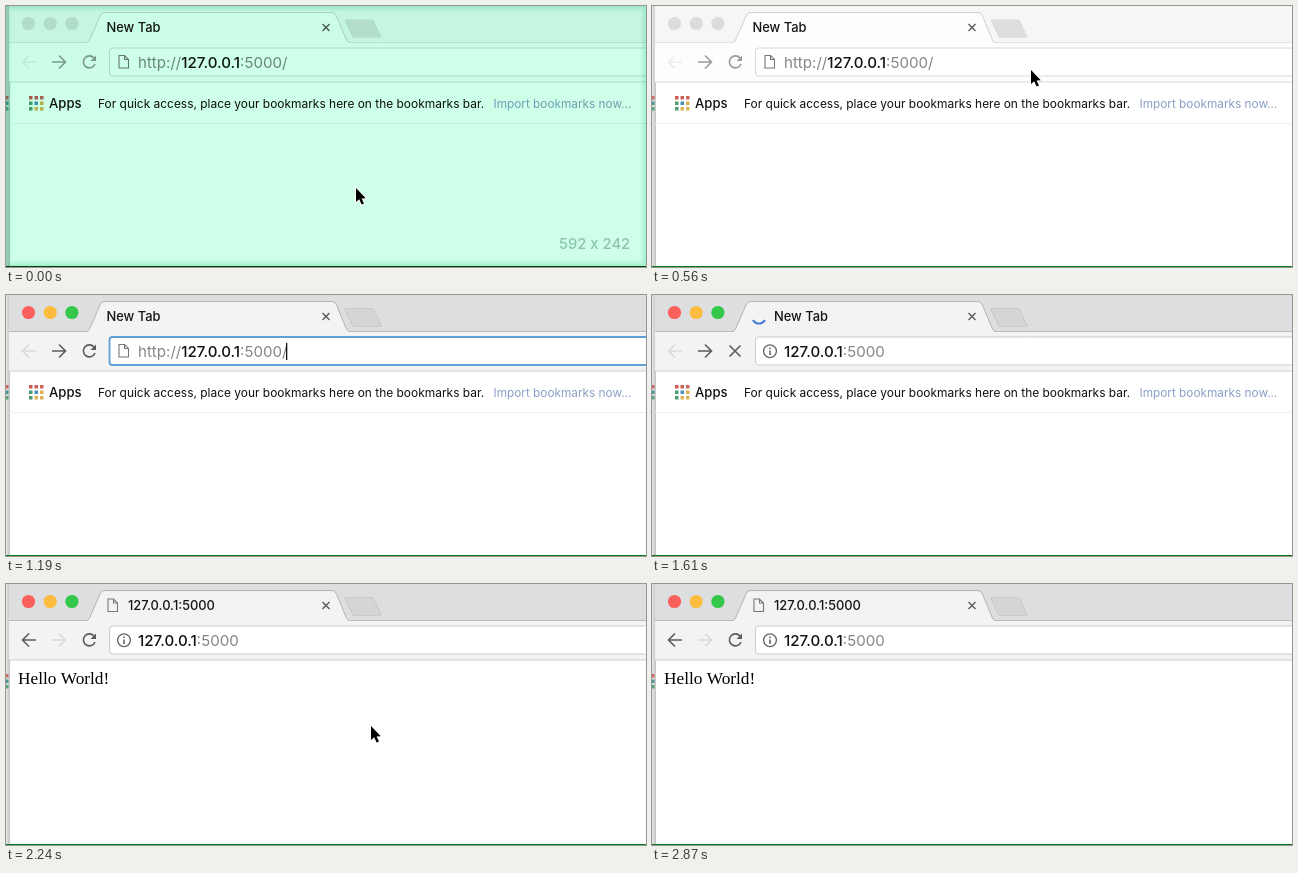
Animation, 640 px wide and 261 px high, one loop 3080 ms. Source, as an HTML page with a canvas:

```html
<!DOCTYPE html>
<html lang="en">
<head>
<meta charset="utf-8">
<title>Local server</title>
<style>
  html, body { margin: 0; width: 100%; height: 100%; overflow: hidden; background: #fff; }
  canvas { display: block; width: 640px; height: 261px; }
</style>
</head>
<body>
<canvas id="stage" width="640" height="261"></canvas>
<script>
const ctx = document.getElementById('stage').getContext('2d');
const LOOP = 3080, STEP = 70;
const FOCUS = 630, TYPED = 980, ENTER = 1470, LOADED = 1680, SETTLED = 1750;
const SANS = 'Inter, "Open Sans", sans-serif';
const SERIF = '"Liberation Serif", serif';

function rect(x, y, w, h, color) {
  ctx.fillStyle = color;
  ctx.fillRect(x, y, w, h);
}

function polygon(points, fill, stroke, width = 1) {
  const path = new Path2D('M' + points.join('L') + 'Z');
  if (stroke) {
    ctx.strokeStyle = stroke;
    ctx.lineWidth = width;
    ctx.stroke(path);
  }
  if (fill) {
    ctx.fillStyle = fill;
    ctx.fill(path);
  }
}

function line(d, color, width = 1.6) {
  ctx.strokeStyle = color;
  ctx.lineWidth = width;
  ctx.stroke(new Path2D(d));
}

function circle(x, y, r, color) {
  ctx.fillStyle = color;
  ctx.beginPath();
  ctx.arc(x, y, r, 0, 7);
  ctx.fill();
}

// Returns the x position where the text ends.
function text(str, x, y, size, color, weight = 400, family = SANS) {
  ctx.font = `${weight} ${size}px ${family}`;
  ctx.fillStyle = color;
  ctx.fillText(str, x, y);
  return x + ctx.measureText(str).width;
}

function pageIcon(x, y) {
  line(`M${x} ${y}h5.5l4 4v8.5h-9.5zM${x + 5.5} ${y}v4h4`, '#777', 1.1);
}

function drawBackdrop() {
  rect(0, 0, 640, 261, '#fff');
  const shade = ctx.createLinearGradient(0, 0, 4, 0);
  shade.addColorStop(0, '#e6e6e6');
  shade.addColorStop(1, '#c2c2c2');
  rect(0, 0, 4, 260, shade);
  ['#c96a62', '#4a9a94', '#59a47c'].forEach((c, i) => rect(0, 90 + i * 5.5, 2.5, 3.5, c));
}

function drawTabs(t) {
  const active = t >= FOCUS;
  rect(3, 0, 637, 37, active ? '#dcdedf' : '#f6f6f6');
  rect(3, 36, 637, 1, active ? '#b9bbbc' : '#e2e2e2');
  const lights = active ? ['#fc605c', '#fdbc40', '#34c84a'] : ['#dcdcdc', '#dcdcdc', '#dcdcdc'];
  lights.forEach((c, i) => circle(22.5 + i * 21.7, 17.5, 6.6, c));

  ctx.fillStyle = active ? '#f3f3f3' : '#fdfdfd';
  ctx.strokeStyle = active ? '#b2b4b5' : '#d0d0d0';
  ctx.lineWidth = 1;
  const tab = new Path2D('M80 37Q83 36 84 33L94 10Q95 6.5 99 6.5H326Q329 6.5 330.5 10L340 33Q341 36 344 37');
  ctx.fill(tab);
  ctx.stroke(tab);
  polygon([[339, 14], [367, 14], [375, 31], [347, 31]],
    active ? '#d3d5d6' : '#dedede', active ? '#b4b6b7' : '#d6d6d6');

  const loading = t >= ENTER && t < SETTLED;
  const title = t >= LOADED ? '127.0.0.1:5000' : 'New Tab';
  text(title, t >= ENTER ? 122 : 100.5, 26, 12.9, '#151515', 450);
  line('M316.5 18l7 7m0-7l-7 7', '#5a5a5a', 1.4);
  if (loading) {
    const turn = (t - 1610) / 1000 * 2 * Math.PI;
    ctx.strokeStyle = '#4b80d0';
    ctx.lineWidth = 2.2;
    ctx.beginPath();
    ctx.arc(107, 21.5, 7, turn + 0.55, turn + 2.6);
    ctx.stroke();
  } else if (t >= SETTLED) {
    pageIcon(102, 15);
  }
}

function drawToolbar(t) {
  const active = t >= FOCUS, loaded = t >= LOADED, loading = t >= ENTER && !loaded;
  const focused = active && t < ENTER;
  const icon = active ? '#5c5c5c' : '#999', disabled = active ? '#dadada' : '#ececec';
  rect(3, 37, 637, 39, active ? '#f3f3f3' : '#fdfdfd');
  rect(3, 75.5, 637, 1, active ? '#cfcfcf' : '#dcdcdc');
  line('M30 56H17M23 49.5L16.5 56l6.5 6.5', loaded ? icon : disabled);
  line('M46 56H59M53 49.5L59.5 56l-6.5 6.5', loaded ? disabled : icon);
  if (loading) {
    line('M77.5 50.5l11 11m0-11l-11 11', icon);
  } else {
    line('M88 52A6 6 0 1 0 89 58', icon);
    polygon([[90, 49.5], [90, 55], [84.5, 55]], icon);
  }

  ctx.fillStyle = '#fff';
  ctx.strokeStyle = focused ? '#609fd6' : active ? '#cdcdcd' : '#d8d8d8';
  ctx.lineWidth = focused ? 1.8 : 1;
  ctx.beginPath();
  ctx.roundRect(103.5, 42, 550, 28, 3);
  ctx.fill();
  ctx.stroke();

  const gray = '#858585';
  let x = 132;
  if (t < ENTER) {
    pageIcon(113, 49.5);
    x = text('http://', x, 62, 15.1, gray);
  } else {
    ctx.strokeStyle = '#666';
    ctx.lineWidth = 1.3;
    ctx.beginPath();
    ctx.arc(118, 56.3, 6.4, 0, 7);
    ctx.stroke();
    rect(117.2, 52.5, 1.6, 1.7, '#666');
    rect(117.2, 55.5, 1.6, 4.5, '#666');
  }
  x = text('127.0.0.1', x, 62, 15.1, '#111', 500);
  x = text(t < ENTER ? ':5000/' : ':5000', x, 62, 15.1, gray);
  if (focused) rect(Math.round(x) - 1, 48, 1.3, 17, '#111');
}

function drawBookmarks() {
  const colors = ['#cf5b52', '#c9605a', '#d0685a', '#4c9c72', '#4a91b5', '#e0b04c', '#4c9c72', '#dfb457', '#dfb457'];
  colors.forEach((c, i) => rect(23 + i % 3 * 5.5, 90 + Math.floor(i / 3) * 5.5, 3.5, 3.5, c));
  text('Apps', 43, 102, 13.1, '#111', 450);
  text('For quick access, place your bookmarks here on the bookmarks bar.', 92, 102, 11.95, '#111');
  text('Import bookmarks now...', 487.5, 102, 11.8, '#8a9fc6');
  rect(3, 117, 637, 1, '#eee');
}

function drawSizeOverlay() {
  ctx.globalCompositeOperation = 'multiply';
  rect(0, 0, 640, 261, '#cdffe9');
  for (let i = 0; i < 4; i++) {
    ctx.strokeStyle = 'rgba(130, 215, 180, .1)';
    ctx.lineWidth = 2 + i * 3;
    ctx.strokeRect(0, 0, 640, 260);
  }
  ctx.globalCompositeOperation = 'source-over';
  text('592 x 242', 553, 243, 14.8, '#8fc4ab', 500);
}

function drawArrow([x, y]) {
  const shape = [[0, 0], [0, 14], [3.2, 11.2], [5.6, 16.6], [8, 15.5], [5.6, 10.4], [9.8, 10.2]];
  polygon(shape.map(([dx, dy]) => [x + dx, y + dy]), '#000', '#fff', 1.8);
}

function drawBeam(x, y) {
  line(`M${x - 3} ${y - 8}q3 0 3 2v12q0 2 -3 2M${x + 3} ${y - 8}q-3 0 -3 2v12q0 2 3 2`, '#333', 1.1);
}

function glide(t, start, end, from, to, ease) {
  const p = ease(Math.min(1, Math.max(0, (t - start) / (end - start))));
  return from.map((v, i) => v + (to[i] - v) * p);
}

const easeOut = p => 1 - (1 - p) ** 2;
const easeIn = p => p * p;

function drawPointer(t) {
  if (t < STEP) drawArrow([350, 182]);
  else if (t < FOCUS) drawArrow(glide(t, 70, 490, [375, 101], [379, 64], easeOut));
  else if (t < TYPED) drawBeam(379, 57);
  else if (t >= 1890 && t <= 2240) drawArrow(glide(t, 1890, 2170, [379, 64], [365, 142], easeOut));
  else if (t > 2240 && t <= 2800) drawArrow(glide(t, 2310, 2800, [365, 142], [337, 258], easeIn));
}

function draw() {
  const t = Math.floor(performance.now() % LOOP / STEP) * STEP;
  drawBackdrop();
  drawTabs(t);
  drawToolbar(t);
  if (t < LOADED) drawBookmarks();
  else text('Hello World!', 12, 100, 17.3, '#000', 400, SERIF);
  if (t < STEP) drawSizeOverlay();
  drawPointer(t);
  rect(0, 260, 640, 1, t < STEP ? '#06420c' : '#0b7a16');
  requestAnimationFrame(draw);
}
draw();
</script>
</body>
</html>
```
